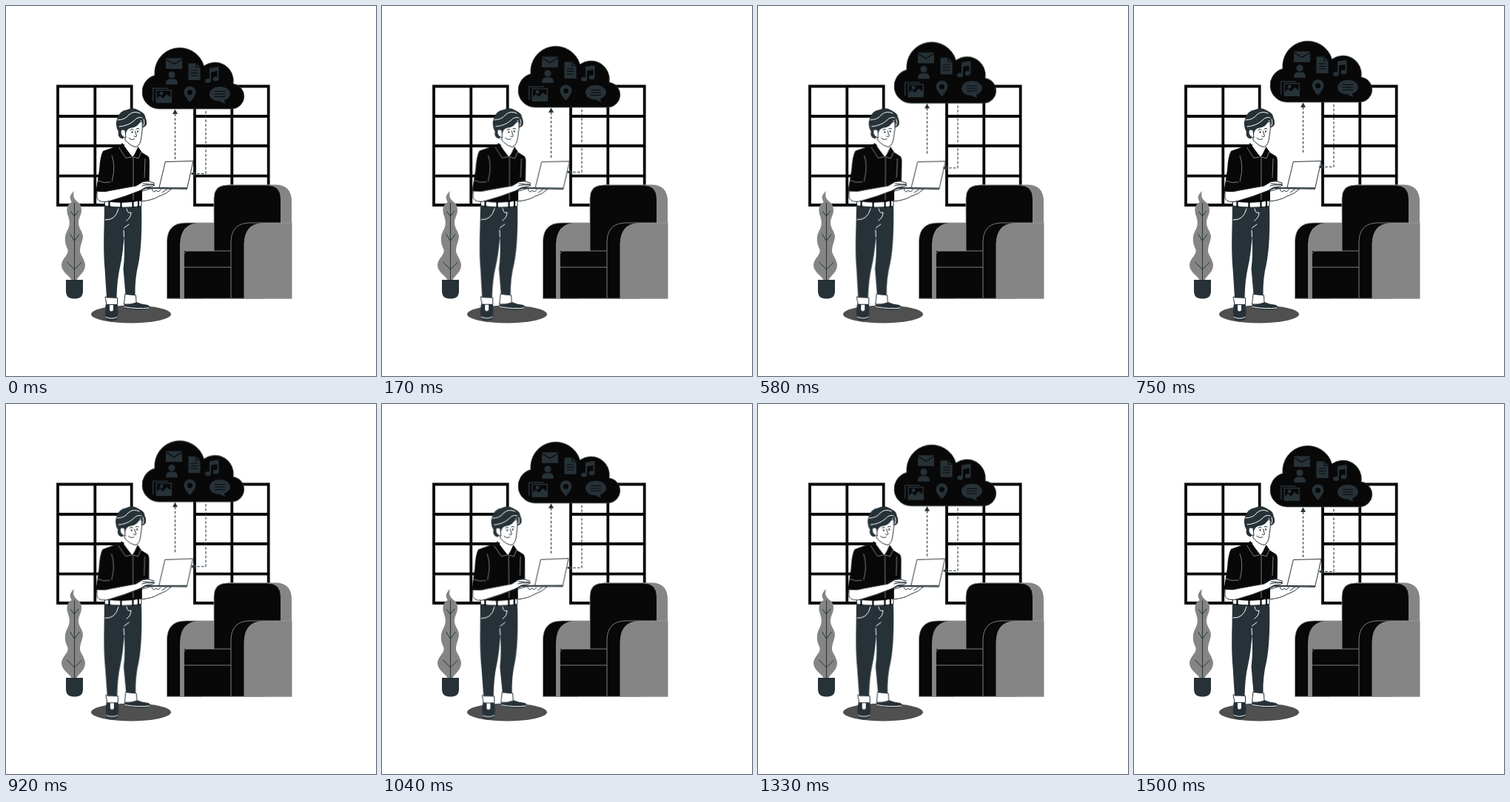
Write an HTML page that moves like this. It is 500 px wide and 500 px high and loops after 1540 ms.

```html
<!DOCTYPE html>
<html lang="en">
<head>
<meta charset="utf-8">
<title>Cloud storage</title>
<style>
html, body { margin: 0; width: 100%; height: 100%; overflow: hidden; background: #fff; }
svg { display: block; width: 100vw; height: 100vh; }
.ink { fill: #090809; }
.slate { fill: #263238; }
.grey { fill: #858585; }
.white { fill: #fff; }
.line { fill: none; stroke: #263238; stroke-width: 1; stroke-linecap: round; stroke-linejoin: round; }
.light { fill: none; stroke: #fff; stroke-width: 1; stroke-linecap: round; stroke-linejoin: round; }
.edge { stroke: #263238; stroke-width: 1; stroke-linejoin: round; }
.seam { fill: none; stroke: #9a9a9a; stroke-width: .8; }
.cut { fill: none; stroke: #090809; stroke-width: 1.2; }
.dash { fill: none; stroke: #263238; stroke-width: 1.1; stroke-dasharray: 3.4 2.4; }
.cloud { animation: float 1540ms linear infinite; }
.man { transform-origin: 187px 282px; animation: sway 1540ms linear infinite; }
@keyframes float {
  0%, 1% { transform: translateY(0); }
  46.75% { transform: translateY(-9.5px); }
  92.5%, 100% { transform: translateY(0); }
}
@keyframes sway {
  0%, 97%, 100% { transform: rotate(0deg); }
  24% { transform: rotate(.8deg); }
  72% { transform: rotate(-.8deg); }
}
</style>
</head>
<body>
<svg viewBox="0 0 500 500">
  <defs>
    <g id="window" fill="none" stroke="#090809" stroke-width="3.800">
      <path d="M70 108.500H169.700V269H70Z"/>
      <path d="M120.300 108V269M70 149H170M70 189H170M70 229.700H170"/>
    </g>
  </defs>

  <use href="#window"/>
  <use href="#window" x="185"/>

  <g class="plant">
    <path class="grey" d="M92 250C85 256 86 261 89 265C82 268 81 276 84 284C87 293 86 298 82 305C78 314 80 322 83 328C86 336 76 340 75 350C75 360 86 364 89 371H95C98 364 107 360 107 350C106 340 99 336 100 329C101 322 104 316 104 311C103 304 98 300 98 293C98 286 102 282 102 276C102 270 100 267 97 265C92 261 90 257 92 250Z"/>
    <path class="line" d="M92.500 266V370M87.500 278L92.500 284L98 277M87 308.500L92.500 317.500L99 308.500M82.500 346L92.500 356L102 346.500"/>
    <path class="slate" d="M81 370H104V385Q104 395.500 93.500 395.500H91.500Q81 395.500 81 385Z"/>
  </g>

  <g class="sofa">
    <path class="grey" d="M300 241.500H364Q386 241.500 386 264V300H300Z"/>
    <path class="ink" d="M281 332V260Q281 242 299 242H353Q371.500 242 371.500 261V300L310 332Z"/>
    <path class="seam" d="M281 332V260Q281 242 299 242H353Q371.500 242 371.500 261V293"/>
    <path class="ink" d="M217.500 395.500V318Q218 293 243 293H265V395.500Z"/>
    <path class="grey" d="M235 395.500V322Q236 293.500 261 293H281V331H241V395.500Z"/>
    <path class="seam" d="M217.500 395V318Q218 293 243 293H281"/>
    <path class="ink" d="M240 395.500V337Q240 331 246 331H306V395.500Z"/>
    <path class="seam" d="M240.500 395V337Q240.500 331 246 331H304M241 353H304"/>
    <path class="ink" d="M304 395.500V318Q305 293 330 293H350V395.500Z"/>
    <path class="grey" d="M321.500 395.500V322Q322 294 347 293H386.500V395.500Z"/>
    <path class="seam" d="M304 395V318Q305 293 330 293H386M217 395.300H386"/>
  </g>

  <ellipse cx="169" cy="416.500" rx="54" ry="12" fill="#505050"/>

  <g class="man">
    <!-- shoes and cuffs -->
    <path class="slate edge" d="M160 402Q168 404 176 400.500Q184 404 192 404.500Q195 406 193 409Q178 412 160 407.500Z"/>
    <path class="light" d="M160 406.500Q178 410 193 408" stroke-width=".8"/>
    <path class="slate edge" d="M135.500 402H150Q152 413 150 423Q143 427 135 423Q133 412 135.500 402Z"/>
    <path class="white" d="M140 402H145L145 411Q142 414 140 411Z"/>
    <path class="light" d="M135 420.500Q143 424 150 420.500"/>
    <path class="white edge" d="M161 389L175.500 391L176 401Q168 404 159.500 403Z"/>
    <path class="white edge" d="M134 393L150.500 394.500L150.500 403.500H136Z"/>

    <!-- trousers -->
    <path class="slate" d="M133 267L132.500 300Q131.500 335 133.500 355L136 394.500H149.500Q150 370 154 353Q158 335 159.500 312Q161 335 158.500 355L161.500 390L174.500 391Q174 368 179 348Q184.500 320 183 267Z"/>
    <path class="light" d="M134 289Q148 290 152 274M163 274Q164 281 169 279Q169 286 163 290M159.500 300L166 295M159.500 312L159 303"/>
    <path class="white edge" d="M133.500 263Q158 268 183 262.500V270.500Q158 274 133.500 270Z"/>
    <path d="M139.500 263V272M155.500 265V273M171.500 264V272.500M179 263V272" stroke="#090809" stroke-width="2.200"/>

    <!-- far forearm and hand -->
    <path class="white edge" d="M178 252L198 246L224 247Q217 254 207 257Q197 263 182 264Z"/>
    <path class="line" d="M197 247Q199 254 203 249Q206 253 209 248M211 252L217 248"/>

    <!-- shirt -->
    <path class="ink" d="M156 187L131 196Q127 203 126 222L122 247Q122 258 126 262L134 264Q160 267 184 263V249L193.500 245L194 211Q194 205 192 203L184 198L179 192Z"/>
    <path class="seam" d="M143 202Q148 216 144 233L141 245M172 203V262M188 206L187 232"/>
    <path class="white" d="M160 177V190L171 204L179 193V184Z"/>
    <path class="ink" d="M157 185L152 191L162 206L170 204.500L160.500 190ZM178.500 190L172 204L179 206L183 197Z"/>
    <path class="seam" d="M152.500 191L162 205.500L170 204M172.500 204L179 206L183 197"/>

    <!-- laptop -->
    <path class="white edge" d="M215.300 210.500L253 209.500L244.800 246L206.800 246Z"/>
    <path class="edge" fill="#858585" d="M176 245L245 246L244.500 247.300L176 246.300Z"/>

    <!-- near forearm and hand -->
    <path class="white edge" d="M123 250Q134 252 143 249L176 243L185 237.500Q192 235.500 200 239Q202 241 196 241L201 242Q197 245 189 245L181 249.500Q160 258 140 263.500Q127 267 123 260Z"/>
    <path class="line" d="M185 240L196 241M184 243Q190 241 196 242"/>
    <path class="ink" d="M125 233L143 237L144 247.500Q132 253 122 250Z"/>
    <path class="seam" d="M124 236Q132 240 141 238"/>

    <!-- head -->
    <path class="white edge" d="M160 162L184 156Q185 166 183 176Q182 188 176 190.500Q168 189.500 161 181Z"/>
    <path class="slate" d="M158 179.500Q150 178 152 170Q147 161 150 153Q152 142 164 140Q172 135.500 181 142Q188 145 188.500 151Q191 156 189.500 161Q187 165 184 164Q186 158 182.500 154Q179 164 168 165Q163 166 162 173Z"/>
    <path class="white edge" d="M161 168Q155 165 155 171Q156 177 162 178Z"/>
    <path class="light" d="M151 154Q161 154 166 147Q173 141 181 145M153 163Q165 162 173 155Q178 149 184 151M186 153Q188 157 186 162"/>
    <path class="line" d="M168 167.500Q170 165.500 172 167M176 166Q178 164.500 180 166M174.500 169L176.500 176Q175 178 173 176M166 178.500Q169 182 173.500 180" stroke-width=".9"/>
    <ellipse class="slate" cx="170.500" cy="170.500" rx=".9" ry="1.400"/>
    <ellipse class="slate" cx="178" cy="169.500" rx=".9" ry="1.400"/>
  </g>

  <g class="cloud">
    <path class="ink" stroke="#35443f" stroke-width=".8" d="M207 139A23 23 0 0 1 201 93.800A34 34 0 0 1 267.500 81A25 25 0 0 1 307 105.200A17 17 0 0 1 306 139Z"/>
    <g class="slate">
      <path d="M216 70.500H238V85H216Z"/>
      <circle cx="224" cy="93" r="4.600"/>
      <path d="M216 106Q216 98.500 221 98.500H227Q232 98.500 232 106Z"/>
      <path d="M246.500 77.500H257L262.500 83V100H246.500Z"/>
      <path d="M275 84L287.500 82V98H285.500V88L277 89.500V101H275Z"/>
      <ellipse cx="273" cy="101" rx="4" ry="3"/>
      <ellipse cx="283.500" cy="98.500" rx="4" ry="3"/>
      <path d="M198 110.500H219V112H199.500V129H198Z"/>
      <path fill-rule="evenodd" d="M202.500 113H224V131H202.500ZM204 114.500V125L208 121L212 125L217 119L222.500 123V114.500Z"/>
      <circle cx="210" cy="118" r="2.500"/>
      <path fill-rule="evenodd" d="M248.500 130Q240.500 121 240.500 116.500A8 8 0 0 1 256.500 116.500Q256.500 121 248.500 130ZM252 116.800A3.500 3.500 0 1 0 245 116.800A3.500 3.500 0 1 0 252 116.800Z"/>
      <path d="M289 109C298 109 303 114 303 119Q302 125 295 127.500L296 132L288 128.500C280 128.500 275 124 275 119C275 114 280 109 289 109Z"/>
    </g>
    <path class="cut" d="M216 72L227 78.500L238 72M257 78V83H262M249.500 87H259.500M249.500 90.500H259.500M249.500 94H259.500M282 115.500H296M282 119H296M282 122.500H296"/>
    <path class="dash" d="M228.500 207V146M270 142V226.500H255"/>
    <path class="slate" d="M228.500 139.500L232 146H225ZM249.500 226.500L256 223V230Z"/>
  </g>
</svg>
</body>
</html>
```
